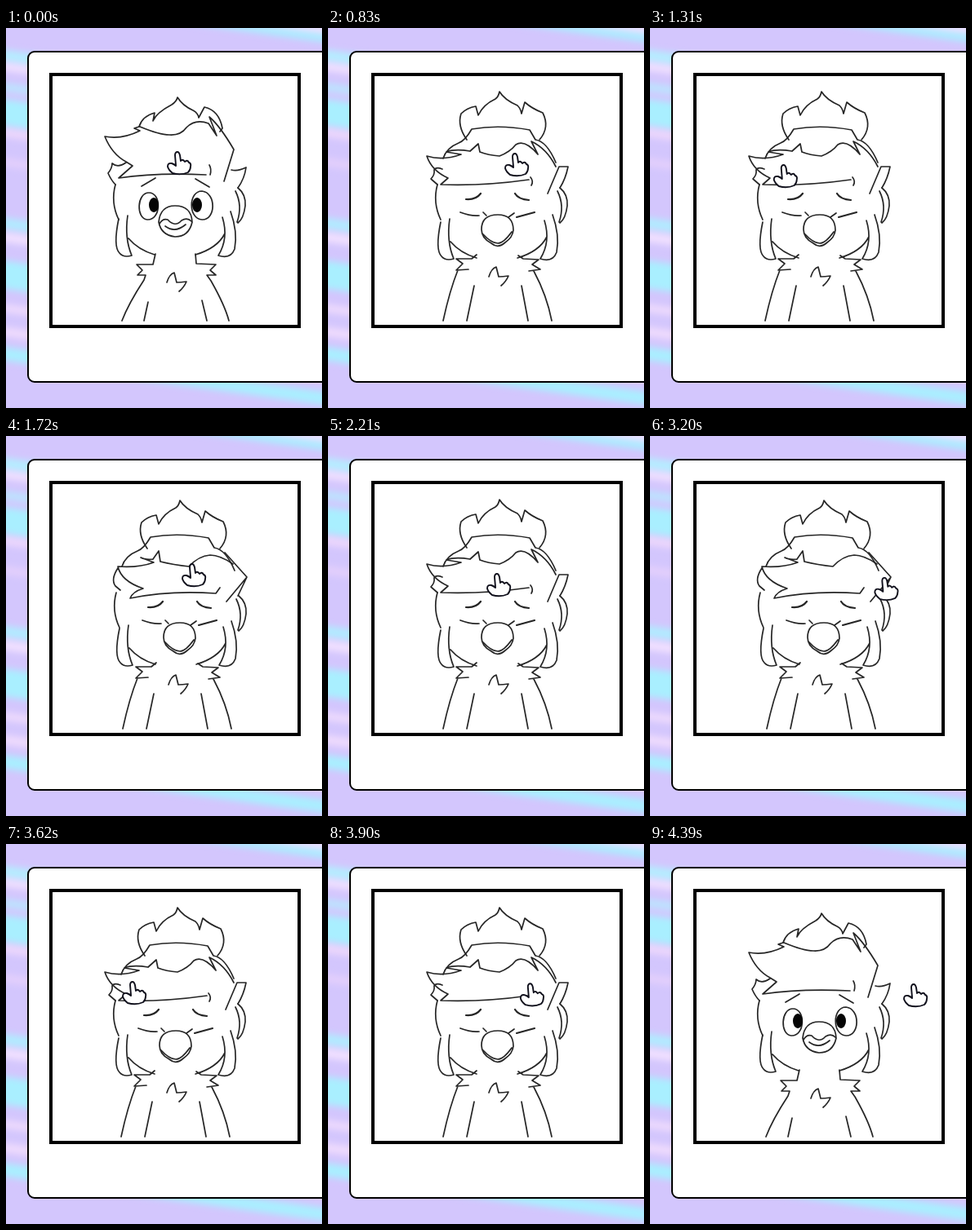
An HTML page that plays this animation: 387 px wide and 466 px high, repeating every 4.46 s.

```html
<!DOCTYPE html>
<html lang="en">
<head>
<meta charset="utf-8">
<title>Head pats</title>
<style>
html, body { margin: 0; width: 100%; height: 100%; overflow: hidden; background: #d3c6fd; }
svg { display: block; width: 387px; height: 466px; }
.art { fill: none; stroke: #262626; stroke-width: 1.7; stroke-linecap: round; stroke-linejoin: round; }
</style>
</head>
<body>
<svg viewBox="0 0 387 466">
  <defs>
    <filter id="soft" x="-20%" y="-20%" width="140%" height="140%"><feGaussianBlur stdDeviation="4"/></filter>
  </defs>
  <rect width="387" height="466" fill="#d3c6fd"/>
  <g id="bands" fill="none" filter="url(#soft)"></g>
  <rect x="27" y="29" width="400" height="405" rx="8" fill="#fff" stroke="#000" stroke-width="2"/>
  <rect x="55" y="57" width="304" height="309" fill="#fff" stroke="#000" stroke-width="4"/>
  <g id="art" class="art"></g>
  <path id="hand" fill="#fff" stroke="#10101c" stroke-width="1.9" stroke-linejoin="round"
    d="M11 17L10 5Q10 1 13 1Q15 1 16 5L17 12Q19 9 22 13Q25 10 27 14Q30 15 29 19Q29 23 26 26Q17 30 7 27Q2 23 1 19Q1 14 6 15Q9 16 11 18Z"/>
</svg>
<script>
const $ = id => document.getElementById(id);
const line = (d, x = 0, y = 0, extra = '') => `<path d="${d}" transform="translate(${x} ${y})" ${extra}/>`;

// Background streaks: colour, height at the left edge, thickness
const bands = [
  ['#a9efff', -42, 10], ['#f5e6ff', -53, 8], ['#b4eeff', 34, 13], ['#f3e2ff', 48, 9],
  ['#b9e6ff', 73, 9], ['#a9efff', 104, 32], ['#f0d9fc', 129, 9], ['#e5d0fc', 165, 9],
  ['#b0ecff', 240, 13], ['#f3e2ff', 257, 11], ['#a9efff', 303, 34], ['#f0dcfd', 344, 9],
  ['#f0dcfd', 373, 11], ['#a9efff', 400, 16]
];
$('bands').innerHTML = bands.map(([c, y, w]) =>
  `<path d="M-20 ${y - 3}L410 ${y + 57}" stroke="${c}" stroke-width="${w}"/>`).join('');

const cheeks = 'M134 192Q128 214 138 235M284 196Q294 204 293 218Q291 234 284 239M281 200Q290 218 283 238';
const locks = 'M138 234Q131 268 139 276Q144 282 154 279Q145 258 149 230M150 258Q162 272 182 278' +
  'M265 232Q273 258 260 279Q275 284 280 271Q284 250 275 225M268 252Q259 270 232 278';
const tuft = 'M197 312Q200 302 206 300L209 312Q214 312 221 311Q218 318 212 323';

const awake = [
  'M163 121Q167 108 182 104L180 114Q184 104 203 94Q209 90 210 85Q216 95 229 101Q235 104 236 110L243 97Q261 101 265 123L262 127',
  'M163 121L157 123L164 126Q142 137 121 133Q130 155 147 164L155 169L138 184Q185 177 245 180M249 168Q252 173 250 180',
  'M164 121Q188 131 200 131Q214 132 221 122Q232 111 248 117L258 132L249 109Q262 120 279 149L267 188',
  'M147 165Q137 172 130 166Q130 172 125 178Q129 187 134 192M276 174Q284 176 294 171Q292 185 284 196',
  'M166 194L183 184M232 185L249 195',
  'M175 202C160 202 159 234 173 235C190 236 191 202 175 202ZM240 200C223 200 223 234 240 235C257 236 258 202 240 200Z',
  'M187 238Q189 218 207 218Q227 218 228 238Q224 256 207 256Q190 254 187 238M188 240Q192 233 198 235Q207 245 215 236Q222 232 227 237M195 243Q207 252 220 241',
  'M183 277L180 290L160 290L167 297L161 303L171 303L169 309Q150 338 142 359',
  'M232 277L233 289L257 290L250 297L257 303L246 303L251 310Q268 340 273 359',
  'M174 336L169 359M240 334L246 359'
];

const crest = 'M170 137Q158 120 163 105Q170 98 181 96L184 107Q190 94 205 87Q209 84 210 78Q216 88 232 95Q236 99 237 105L241 91Q250 99 263 104Q272 122 259 137';
const base = 'M141 160Q145 147 160 141Q168 138 176 124Q210 118 247 125L254 137Q268 139 279 165';
const face = 'M162 226Q175 231 185 230M190 226L194 230M221 232L228 227';
const lids = 'M169 210Q181 211 187 203M229 203Q233 210 246 211M231 232L253 226';
const beak = 'M188 247Q188 229 208 229Q227 229 227 248Q226 257 217 263Q208 271 200 264Q188 258 188 247M189 252Q200 264 208 264Q215 264 225 250';
const body = 'M182 278L176 283L157 283L165 289L157 297L172 296M159 297Q149 322 141 359' +
  'M233 279L239 283L258 284L250 290L260 296L246 298M252 298Q268 328 274 359M179 316L170 359M237 316L245 359';

// Fringe and ears of each petted pose, then shifts of crest, base, face, sides and body
const petted = {
  B: ['M174 151L184 142L186 152Q196 156 210 157Q223 152 230 143Q241 136 257 155L249 139Q268 148 279 170' +
      'M174 151Q155 148 145 152L163 155Q141 163 121 157Q127 175 147 184L138 192Q190 194 246 186M248 183Q252 188 249 193' +
      'M140 173Q132 170 130 174Q131 180 126 185L134 192M269 203L283 170L294 170Q291 185 284 196',
      [0, 0], [0, 0], [0, 0], [0, 4], [0, 0]],
  C: ['M180 151L187 141L189 154Q205 158 224 160Q236 147 250 146Q262 146 278 157M268 143L295 173L270 203' +
      'M180 151Q170 152 165 149L181 155Q162 162 137 160Q141 178 168 187Q155 191 152 199Q200 189 257 193L262 186' +
      'M137 162Q128 176 134 184L140 189M295 173L284 196', [3, 1], [1, 0], [5, 0], [1, 2], [2, 0]],
  D: ['M169 158L176 145L178 158L189 161Q198 142 208 143Q221 144 233 158L223 138Q252 150 260 164L259 199' +
      'M169 158Q150 158 132 151L139 159Q120 168 99 166Q109 183 132 191L125 203Q180 193 235 195M233 183Q239 188 236 197' +
      'M124 193L129 201M272 165L284 164Q282 180 275 196', [-9, 0], [-6, 0], [-8, 0], [-5, 5], [-1, 0]]
};

function pettedArt([fringe, top, brim, mood, side, trunk]) {
  return line(crest, ...top) + line(base, ...brim) + line(fringe) + line(face, ...mood) +
    line(lids, ...mood, 'stroke-width="2.2"') + line(beak, ...mood) +
    line(cheeks, side[0]) + line(locks, ...side) + line(body, ...trunk) + line(tuft, trunk[0], -7);
}

const poses = {
  A: [...awake, cheeks, locks, tuft].map(d => line(d)).join('') +
    '<g fill="#050505" stroke="none"><ellipse cx="181" cy="217" rx="6" ry="9"/><ellipse cx="234" cy="217" rx="6" ry="9"/></g>'
};
for (const p in petted) poses[p] = pettedArt(petted[p]);

// Pose letter followed by the number of steps it lasts
const poseAt = 'A4B4C3B5D3B2C5B1D4B3C3B1D5B2C5B3D2B5A4'
  .replace(/(\w)(\d)/g, (_, p, n) => p.repeat(n));

// Hand strokes: step, x, y
const strokes = [
  [0, 197, 151], [1, 197, 151], [5, 125, 167], [9, 252, 157], [10, 252, 157], [12, 216, 153],
  [17, 100, 168], [18, 100, 168], [22, 303, 164], [25, 215, 156], [28, 67, 155], [29, 67, 155],
  [32, 194, 168], [35, 282, 166], [39, 120, 169], [40, 86, 167], [41, 86, 167],
  [47, 312, 174], [48, 312, 174], [52, 142, 168], [53, 122, 169], [58, 310, 171], [63, 310, 171]
];

const LOOP = 4460;
const stepMs = i => [2, 14, 22].includes(i) ? 60 : i === 33 ? 80 : 70;

function stepAt(t) {
  let i = 0;
  while (i < 63 && t >= stepMs(i)) t -= stepMs(i++);
  return i;
}

let pose;
function draw(now) {
  const i = stepAt(now % LOOP);
  if (poseAt[i] !== pose) $('art').innerHTML = poses[pose = poseAt[i]];
  const k = Math.max(1, strokes.findIndex(s => s[0] >= i));
  const [a, b] = [strokes[k - 1], strokes[k]];
  const u = (i - a[0]) / (b[0] - a[0]);
  const at = n => a[n] + (b[n] - a[n]) * u;
  $('hand').setAttribute('transform', `translate(${at(1)} ${at(2)})`);
}

let start;
function tick(now) {
  start ??= now;
  draw(now - start);
  requestAnimationFrame(tick);
}
draw(0);
requestAnimationFrame(tick);
</script>
</body>
</html>
```
